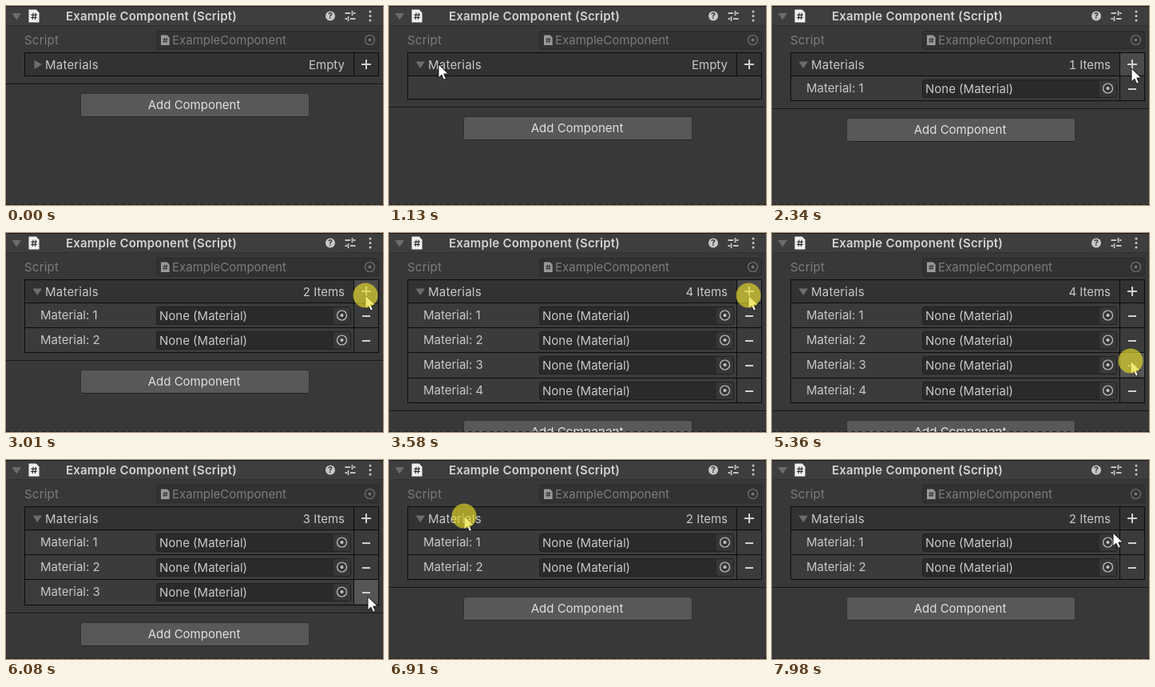
Recreate the animation shown at these times as an HTML page. Size 472x249 px, loop 8000 ms.

```html
<!DOCTYPE html>
<html lang="en">
<head>
<meta charset="utf-8">
<title>Component list</title>
<style>
  html, body { margin: 0; width: 100%; height: 100%; overflow: hidden; background: #383838; }
  svg { display: block; width: 472px; height: 249px; }
  text { font: 15px Inter, sans-serif; fill: #c8c8c8; white-space: pre; }
  .dim { fill: #7c7c7c; }
  .wide { letter-spacing: .22px; }
  .mark { stroke: #d0d0d0; stroke-width: 2; }
  .line { fill: #0c0c0c; }
  #count { font-variant-numeric: tabular-nums; }
</style>
</head>
<body>
<svg viewBox="0 0 472 249">
  <defs>
    <g id="page">
      <path d="M0 0H10L14 4V16H0Z" fill="#f0f0f0"/>
      <path d="M6 4L5 12.5M9.4 4L8.4 12.5M3 6.6H11.2M2.8 9.8H11" stroke="#2c2c2c" stroke-width="1.2" fill="none"/>
    </g>
    <g id="picker">
      <circle r="6" fill="none" stroke="#c4c4c4" stroke-width="1.2"/>
      <circle r="2" fill="#c4c4c4"/>
    </g>
  </defs>

  <rect width="472" height="249" fill="#383838"/>
  <rect width="472" height="24" fill="#3e3e3e"/>
  <rect width="472" height="1" fill="#1a1a1a"/>
  <rect y="24" width="472" height="1" fill="#303030"/>
  <path d="M7.5 9H19L13.2 17.5Z" fill="#6c6c6c"/>
  <use href="#page" transform="translate(28.5 4.5) scale(.93 1)"/>
  <text class="wide" x="75" y="18" style="font-weight:600;fill:#d4d4d4">Example Component (Script)</text>
  <circle cx="406" cy="12.5" r="6" fill="#c8c8c8"/>
  <text x="406" y="16.3" text-anchor="middle" style="font-size:10.5px;font-weight:700;fill:#3a3a3a">?</text>
  <path d="M424.5 9H431M435 9H437.5M424.5 16H427M431 16H437.5M433.5 6V12M428.5 13V19" stroke="#c4c4c4" stroke-width="1.8"/>
  <g fill="#c8c8c8"><circle cx="456" cy="7" r="1.5"/><circle cx="456" cy="12.5" r="1.5"/><circle cx="456" cy="18" r="1.5"/></g>

  <text class="dim wide" x="23" y="48">Script</text>
  <rect x="188.5" y="31.5" width="278" height="22" rx="2.5" fill="#323232" stroke="#2a2a2a"/>
  <use href="#page" transform="translate(194 36.5) scale(.76 .78)" opacity=".55"/>
  <text class="dim" x="208" y="48">ExampleComponent</text>
  <use href="#picker" x="455.5" y="42.5" opacity=".45"/>

  <g id="footer">
    <rect y="10" width="472" height="1" fill="#151515"/>
    <rect y="11" width="472" height="1" fill="#3e3e3e"/>
    <rect x="93.5" y="22.5" width="286" height="29" rx="3" fill="#585858" stroke="#303030"/>
    <path d="M96 51.5H377" stroke="#242424"/>
    <text x="235.5" y="42" text-anchor="middle" style="fill:#e0e0e0">Add Component</text>
  </g>
  <path d="M0 248.5H472" stroke="#1e1e1e" stroke-dasharray="5 4"/>

  <rect id="frame" x="23.5" y="58.5" width="443" fill="#3b3b3b" stroke="#0c0c0c"/>
  <rect x="24" y="59" width="442" height="28" fill="#323232"/>
  <rect id="plusLit" x="436" y="59" width="30" height="28" fill="#4a4a4a"/>
  <rect class="line" x="23" y="87" width="444" height="1"/>
  <rect class="line" x="435" y="58" width="1" height="30"/>
  <path id="fold" fill="#6c6c6c"/>
  <text class="wide" x="49" y="79">Materials</text>
  <text id="count" x="424" y="79" text-anchor="end"></text>
  <path class="mark" d="M445 73H457M451 67V79"/>
  <g id="rows"></g>

  <path id="cursor" d="M0 0V16.8L3.9 13.2L6.6 19.2L9.4 18L6.8 12H12.3Z" fill="#fff" stroke="#111" stroke-width=".9"/>
  <circle id="press" r="15.5" fill="#e6dc28" opacity=".65"/>
</svg>
<script>
const LOOP = 8000, ROW = 31.2, TOP = 87;
const $ = id => document.getElementById(id);

// Cursor moves: start, end, from x, y, to x, y
const moves = [
  [320, 940, 123, 228, 62, 73],
  [1270, 1970, 62, 73, 450, 78],
  [3920, 4420, 450, 78, 453, 131],
  [4750, 5030, 453, 131, 449, 160],
  [5550, 5840, 449, 160, 453, 171],
  [6180, 6800, 453, 171, 109, 69],
  [6800, 6910, 109, 69, 94, 70],
  [7460, 7980, 94, 70, 427, 91]
];
const presses = [
  [980, 1080], [2250, 2340], [2580, 2690], [2910, 3020], [3250, 3310], [3580, 3740],
  [4610, 4700], [5220, 5370], [5980, 6080], [6910, 7050], [7280, 7380]
];
const added = [2340, 2730, 3060, 3350, 3780];
const removed = [4750, 5410, 6130];
// Highlighted remove buttons: start, end, row
const lit = [[4610, 4750, 1], [5220, 5410, 2], [5980, 6130, 2]];

const past = (list, t) => list.filter(v => t >= v).length;
const within = (t, [a, b]) => t >= a && t < b;
const ease = p => p * p * (3 - 2 * p);
const show = (el, on) => el.setAttribute('display', on ? 'inline' : 'none');

const rows = [0, 1, 2, 3, 4].map(i => {
  const g = document.createElementNS('http://www.w3.org/2000/svg', 'g');
  g.setAttribute('transform', `translate(0 ${TOP + Math.round(i * ROW)})`);
  g.innerHTML = `
    <rect class="lit" x="436" y="1" width="30" height="30" fill="#555"/>
    <rect class="line" x="435" width="1" height="31"/>
    <text x="43" y="21">Material: ${i + 1}</text>
    <rect x="188.5" y="5.5" width="243" height="22" rx="2.5" fill="#2a2a2a" stroke="#202020"/>
    <rect x="410" y="6" width="21" height="21" rx="2" fill="#373737"/>
    <text x="192" y="22">None (Material)</text>
    <use href="#picker" x="420.5" y="16"/>
    <path class="mark" d="M446 17H456"/>
    <rect class="line" x="23" y="${Math.round((i + 1) * ROW) - Math.round(i * ROW)}" width="444" height="1"/>`;
  $('rows').append(g);
  return g;
});

function cursorAt(t) {
  const [a, b, x0, y0, x1, y1] = moves.filter(m => t >= m[0]).pop() || moves[0];
  const p = ease(Math.min(1, Math.max(0, (t - a) / (b - a))));
  return [x0 + (x1 - x0) * p, y0 + (y1 - y0) * p];
}

function draw(t) {
  const count = past(added, t) - past(removed, t);
  const open = t >= 1130 && !within(t, [7050, 7420]);
  const height = !open ? 0 : count ? Math.round(count * ROW) : 29;

  $('frame').setAttribute('height', 29 + height);
  $('footer').setAttribute('transform', `translate(0 ${TOP + height})`);
  $('fold').setAttribute('d', open ? 'M33.5 69.5H45L39.2 78Z' : 'M35.5 67.5V79L45 73.2Z');
  $('count').textContent = count ? `${count} Items` : 'Empty';
  show($('plusLit'), within(t, [2250, 3780]));
  rows.forEach((g, i) => {
    show(g, open && i < count);
    show(g.querySelector('.lit'), lit.some(l => l[2] === i && within(t, l)));
  });

  const [x, y] = cursorAt(t);
  const at = `translate(${x.toFixed(1)} ${y.toFixed(1)})`;
  $('cursor').setAttribute('transform', at);
  $('press').setAttribute('transform', at);
  show($('cursor'), t >= 320);
  show($('press'), presses.some(p => within(t, p)));
}

const start = performance.now();
function tick() {
  draw((performance.now() - start) % LOOP);
  requestAnimationFrame(tick);
}
tick();
</script>
</body>
</html>
```
